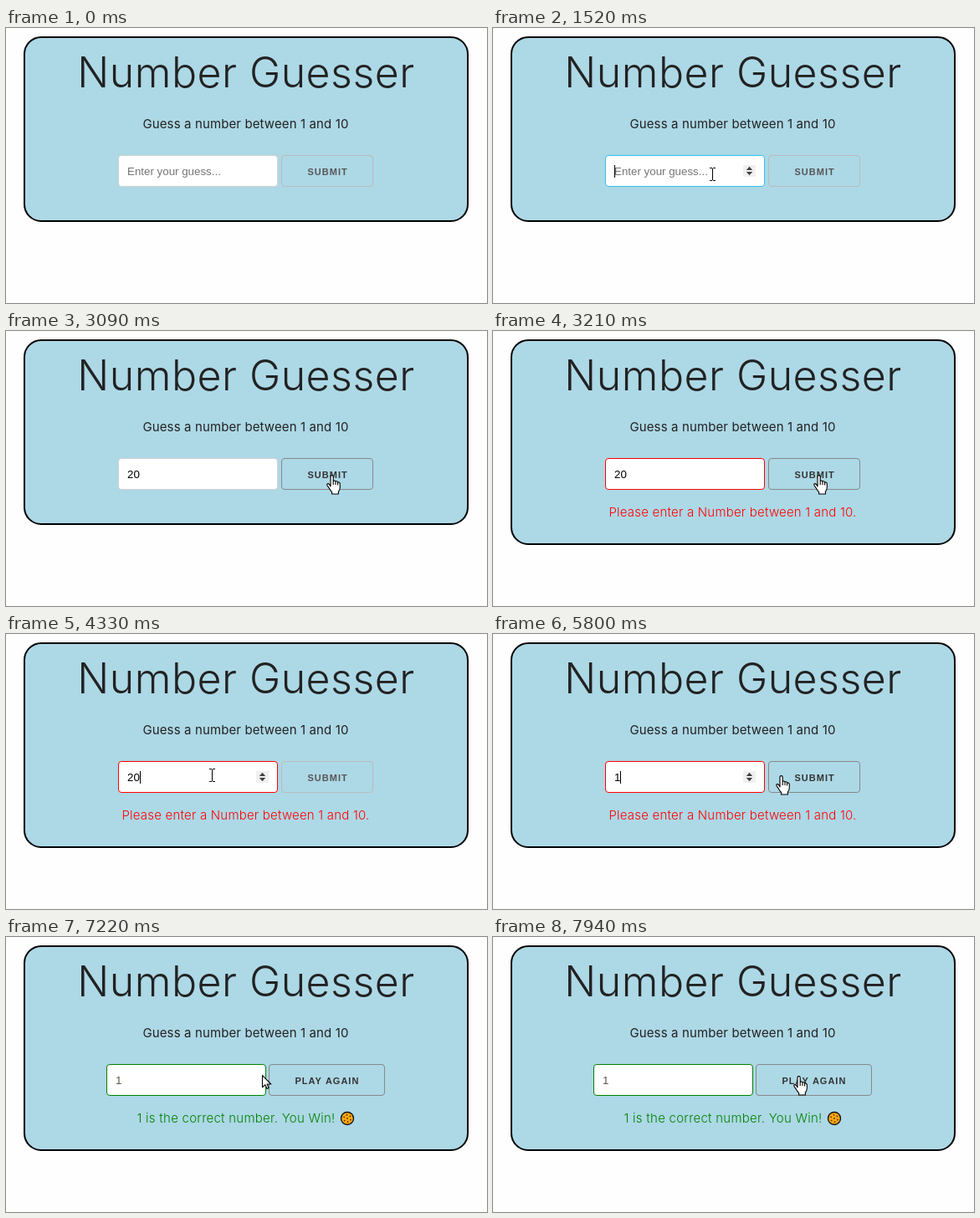
These frames come from a looping animation (575 by 329 pixels, 8 s). An HTML page with a canvas:

```html
<!DOCTYPE html>
<html lang="en">
<head>
<meta charset="utf-8">
<title>Number Guesser</title>
<style>
  html, body { margin: 0; width: 100%; height: 100%; overflow: hidden; background: #fefefe; }
  canvas { display: block; }
</style>
</head>
<body>
<canvas id="stage" width="575" height="329"></canvas>
<script>
const ctx = document.getElementById('stage').getContext('2d');
const LOOP = 8000;
const UI = 'Inter, sans-serif';
const FORM = '"Liberation Sans", Arial, sans-serif';

// Form state; each entry overrides the ones before it.
const steps = [
  { at: 0, value: '', caret: false, spin: false, focusBtn: false, border: '#d1d1d1', result: '' },
  { at: 1290, spin: true },
  { at: 1520, caret: true, border: '#33c3f0' },
  { at: 2090, value: '2' },
  { at: 2200, value: '20' },
  { at: 2770, caret: false },
  { at: 3090, spin: false, focusBtn: true, border: '#d1d1d1' },
  { at: 3210, border: '#ff0000', result: 'error' },
  { at: 4070, spin: true },
  { at: 4330, caret: true, focusBtn: false },
  { at: 4700, caret: false },
  { at: 4820, caret: true, value: '2' },
  { at: 4940, value: '' },
  { at: 5370, value: '1' },
  { at: 5920, caret: false },
  { at: 6270, spin: false, focusBtn: true },
  { at: 6510, border: '#008000', result: 'win' }
];

// Pointer glides: first step, last step, step count, target x, target y.
const start = [613, 317];
const glides = [
  [450, 1170, 7, 263, 174],
  [1290, 1290, 1, 262, 175],
  [2550, 2880, 4, 389, 172],
  [3830, 4070, 3, 246, 169],
  [5800, 5800, 1, 344, 169],
  [5920, 6020, 2, 350, 171],
  [6850, 7580, 7, 273, 161],
  [7700, 7940, 3, 365, 166]
];

const ARROW = new Path2D('M.5 .7V14.8L3.8 11.8 6 16.6 8.2 15.6 6.1 11H10.8Z');
const HAND = new Path2D('M5 14V2.2Q5 .6 6.6 .6T8.2 2.2V8Q8.3 6.9 9.6 7T11 8.5Q11.2 7.5 12.4 7.8T13.6 9.4' +
  'Q14 8.6 15 9T16.3 10.5V15Q16.3 18 14.4 20V23H6.6V20.6Q4.5 18.5 3 15.6L.8 12.2Q.5 10.7 2 10.6T5 14Z' +
  'M8.2 8V12M11 8.5V12M13.6 9.4V12.5');

function formAt(t) {
  return Object.assign({}, ...steps.filter(s => s.at <= t));
}

function pointerAt(t) {
  let [x, y] = start;
  for (const [from, to, count, tx, ty] of glides) {
    if (t < from) break;
    const gap = (to - from) / Math.max(1, count - 1);
    const done = gap ? Math.min(count, Math.floor((t - from) / gap + 1e-6) + 1) : 1;
    x += (tx - x) * done / count;
    y += (ty - y) * done / count;
  }
  return [Math.round(x), Math.round(y)];
}

function pointerKind(t, x, win) {
  if (t < 450) return 'none';
  if (t < 1290) return 'arrow';
  if (x >= (win ? 314 : 329)) return 'hand';
  return win ? 'arrow' : 'beam';
}

function text(str, x, y, font, color, spacing = 0, align = 'left') {
  ctx.font = font;
  ctx.fillStyle = color;
  ctx.letterSpacing = spacing + 'px';
  ctx.textAlign = align;
  ctx.fillText(str, x, y);
}

function box(x, y, w, h, r, line, color, fill) {
  ctx.beginPath();
  ctx.roundRect(x + line / 2, y + line / 2, w - line, h - line, r - line / 2);
  if (fill) {
    ctx.fillStyle = fill;
    ctx.fill();
  }
  ctx.lineWidth = line;
  ctx.strokeStyle = color;
  ctx.stroke();
}

function disc(x, y, r, color) {
  ctx.beginPath();
  ctx.arc(x, y, r, 0, Math.PI * 2);
  ctx.fillStyle = color;
  ctx.fill();
}

function triangle(x, y, dir) {
  ctx.beginPath();
  ctx.moveTo(x - 3.7, y);
  ctx.lineTo(x + 3.7, y);
  ctx.lineTo(x, y + 4.3 * dir);
  ctx.fillStyle = '#404040';
  ctx.fill();
}

function drawInput(s, x, win) {
  const font = '13.333px ' + FORM;
  box(x, 152, 191, 38, 4, 1, s.border, '#fff');
  if (s.value) text(s.value, x + 11, 176, font, win ? '#5c5445' : '#000');
  else text('Enter your guess...', x + 11, 176, font, '#757575');
  if (s.caret) {
    const end = x + 11 + ctx.measureText(s.value).width;
    ctx.fillStyle = '#000';
    ctx.fillRect(Math.round(end), 164, 1, 15);
  }
  if (s.spin) {
    ctx.fillStyle = '#f0f0f0';
    ctx.fillRect(x + 165, 164, 15, 14);
    triangle(x + 172.5, 170, -1);
    triangle(x + 172.5, 172, 1);
  }
}

function drawButton(label, x, w, active) {
  box(x, 152, w, 38, 4, 1, active ? '#888' : '#bbb');
  text(label, x + 31.5, 176, 'bold 11px ' + FORM, active ? '#333' : '#555', 1);
}

function drawCookie(x, y) {
  disc(x, y, 8.2, '#111');
  disc(x, y, 6.8, '#ffa812');
  disc(x, y, 0.9, '#4a2c00');
  for (let i = 0; i < 6; i++) {
    const a = i * Math.PI / 3 + 0.4;
    disc(x + 4.2 * Math.cos(a), y + 4.2 * Math.sin(a), 0.9, '#4a2c00');
  }
}

function drawResult(result) {
  const font = '300 15px ' + UI;
  if (result === 'error') {
    text('Please enter a Number between 1 and 10.', 286.5, 222, font, '#ff0000', 0.2, 'center');
  } else if (result === 'win') {
    text('1 is the correct number. You Win!', 275, 222, font, '#008000', 0.25, 'center');
    drawCookie(408, 217);
  }
}

function drawPointer(kind, x, y) {
  if (kind === 'none') return;
  if (kind === 'beam') {
    ctx.fillStyle = '#000';
    ctx.fillRect(x, y - 7, 1, 14);
    for (const top of [y - 8, y + 7]) {
      ctx.fillRect(x - 3, top, 3, 1);
      ctx.fillRect(x + 1, top, 3, 1);
    }
    return;
  }
  const hand = kind === 'hand';
  const shape = hand ? HAND : ARROW;
  ctx.save();
  ctx.translate(hand ? x - 6 : x, y);
  ctx.fillStyle = '#fff';
  ctx.strokeStyle = '#000';
  ctx.lineWidth = 1.1;
  ctx.lineJoin = 'round';
  ctx.fill(shape);
  ctx.stroke(shape);
  ctx.restore();
}

function draw(t) {
  const s = formAt(t);
  const win = s.result === 'win';
  const [x, y] = pointerAt(t);
  const kind = pointerKind(t, x, win);

  ctx.fillStyle = '#fefefe';
  ctx.fillRect(0, 0, 575, 329);
  box(21, 10, 532, s.result ? 246 : 222, 21, 2, '#000', '#add8e6');
  text('Number Guesser', 287, 70.5, '300 50px ' + UI, '#222', 0.5, 'center');
  text('Guess a number between 1 and 10', 286.5, 120, '15px ' + UI, '#222', 0.12, 'center');

  const active = s.focusBtn || kind === 'hand';
  drawInput(s, win ? 120 : 134, win);
  if (win) drawButton('PLAY AGAIN', 314, 139, active);
  else drawButton('SUBMIT', 329, 110, active);
  drawResult(s.result);
  drawPointer(kind, x, y);
}

const began = performance.now();
function tick() {
  draw((performance.now() - began) % LOOP);
  requestAnimationFrame(tick);
}
tick();
</script>
</body>
</html>
```
